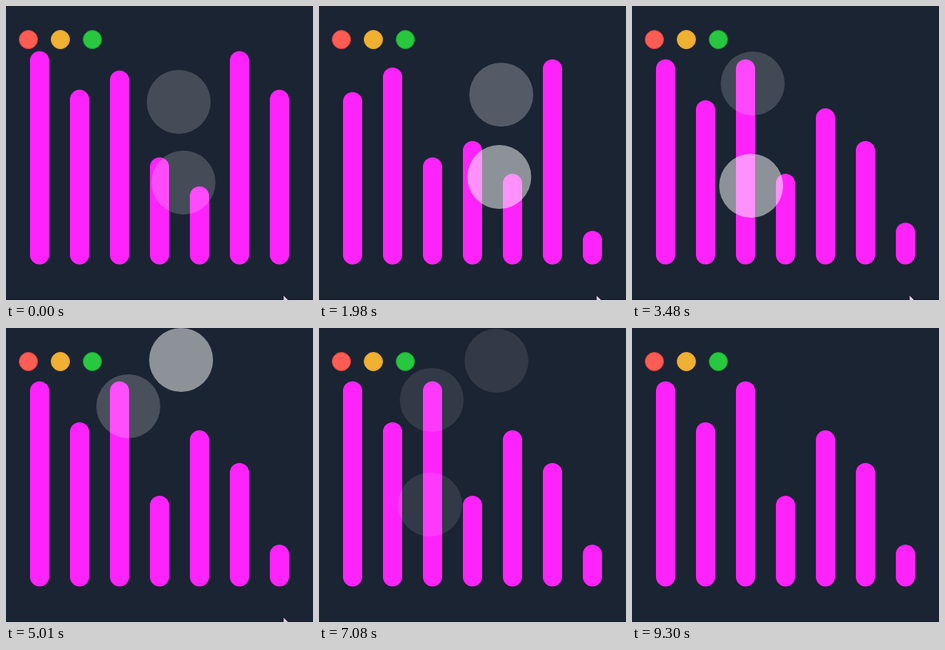
An HTML page for the animation above (9360 ms loop, 384 px wide and 368 px high).

```html
<!DOCTYPE html>
<html lang="en">
<head>
<meta charset="utf-8">
<title>Touch bars</title>
<style>
html, body { margin: 0; width: 100%; height: 100%; overflow: hidden; background: #1b2433; }
svg { display: block; width: 384px; height: 368px; }
</style>
</head>
<body>
<svg viewBox="0 0 384 368">
  <rect width="384" height="368" fill="#1b2433"/>
  <rect y="367" width="384" height="1" fill="#151b29"/>
  <g id="lights"></g>
  <g id="bars" fill="#ff23fb"></g>
  <g id="touches" fill="#fff"></g>
  <path id="cursor" d="M0 0V7H7Z" fill="#e3d3e6" stroke="#0e1220" stroke-width=".6"/>
</svg>
<script>
const LOOP = 9360, STEP = 30, GROW = 750, FADE = 150;
const BASE = 323.5, FULL = 266;

// Each data set: transition start, value at full height, values
const sets = [
  { at: -GROW, max: 22, v: [22, 18, 20, 11, 8, 22, 18] },
  { at: 690, max: 26, v: [21, 24, 13, 15, 11, 25, 4] },
  { at: 1950, max: 26, v: [25, 20, 25, 11, 19, 15, 5] }
];

const clamp = n => Math.max(0, Math.min(1, n));
const mix = (a, b, k) => a + (b - a) * k;
const ramp = (t, a, b) => clamp((t - a) / (b - a));
const cubic = k => k < .5 ? 4 * k ** 3 : 1 - 4 * (1 - k) ** 3;

const tap = (x, y, from, to) => ({ from, to, pos: () => [x, y] });

// The held finger drifts left and back, then slightly up
const held = {
  from: 3900, to: 6780,
  pos: t => [222 - 3 * Math.sin(Math.PI * ramp(t, 3930, 6090)), 40 - 2 * ramp(t, 5010, 6090)]
};

const touches = [
  tap(216, 120, -500, 90), tap(222, 221, -500, 90),
  tap(225.5, 214, 1800, 2370), tap(228, 111, 1905, 2400),
  tap(149, 225, 3090, 3750), tap(151, 97, 3150, 3567),
  held,
  tap(153, 98, 4320, 4800), tap(153, 98, 4950, 5460),
  tap(141.5, 89.5, 5640, 6750), tap(139, 220, 6054, 6750),
  ...[[222, 41], [141, 90], [139, 221]].map(([x, y], i) => tap(x, y, 7050, 7500 + 90 * i))
];

function set(el, attrs) {
  for (const name in attrs) el.setAttribute(name, attrs[name]);
}
function add(id, tag, attrs) {
  const el = document.createElementNS('http://www.w3.org/2000/svg', tag);
  set(el, attrs);
  return document.getElementById(id).appendChild(el);
}

[['#ff5c54', '#cf413c'], ['#f0b031', '#e5a52c'], ['#27c840', '#179b2b']].forEach(([fill, stroke], i) =>
  add('lights', 'circle', { cx: 28 + 40 * i, cy: 42, r: 11.5, fill, stroke }));
const bars = sets[0].v.map((_, i) => add('bars', 'rect', { x: 30 + 50 * i, width: 24, rx: 12 }));
const dots = touches.map(() => add('touches', 'circle', { r: 40 }));
const cursor = document.getElementById('cursor');

function draw(t) {
  bars.forEach((bar, i) => {
    const height = 1 + sets.reduce((h, s) =>
      mix(h, s.v[i] / s.max * FULL, cubic(ramp(t, s.at, s.at + GROW))), 0);
    set(bar, { y: BASE - height, height });
  });
  dots.forEach((dot, i) => {
    const { from, to, pos } = touches[i];
    const [cx, cy] = pos(t);
    const shown = ramp(t, from, from + FADE), left = ramp(t, to, to - FADE);
    set(dot, { cx, cy, opacity: .5 * shown * left ** 2 });
  });
  const x = mix(347, 349, ramp(t, 5670, 6060));
  set(cursor, { transform: `translate(${x} 362)`, opacity: t < 6690 ? 1 : 0 });
}

const start = performance.now();
function tick() {
  const t = (performance.now() - start) % LOOP;
  draw(Math.floor(t / STEP) * STEP);
  requestAnimationFrame(tick);
}
tick();
</script>
</body>
</html>
```
